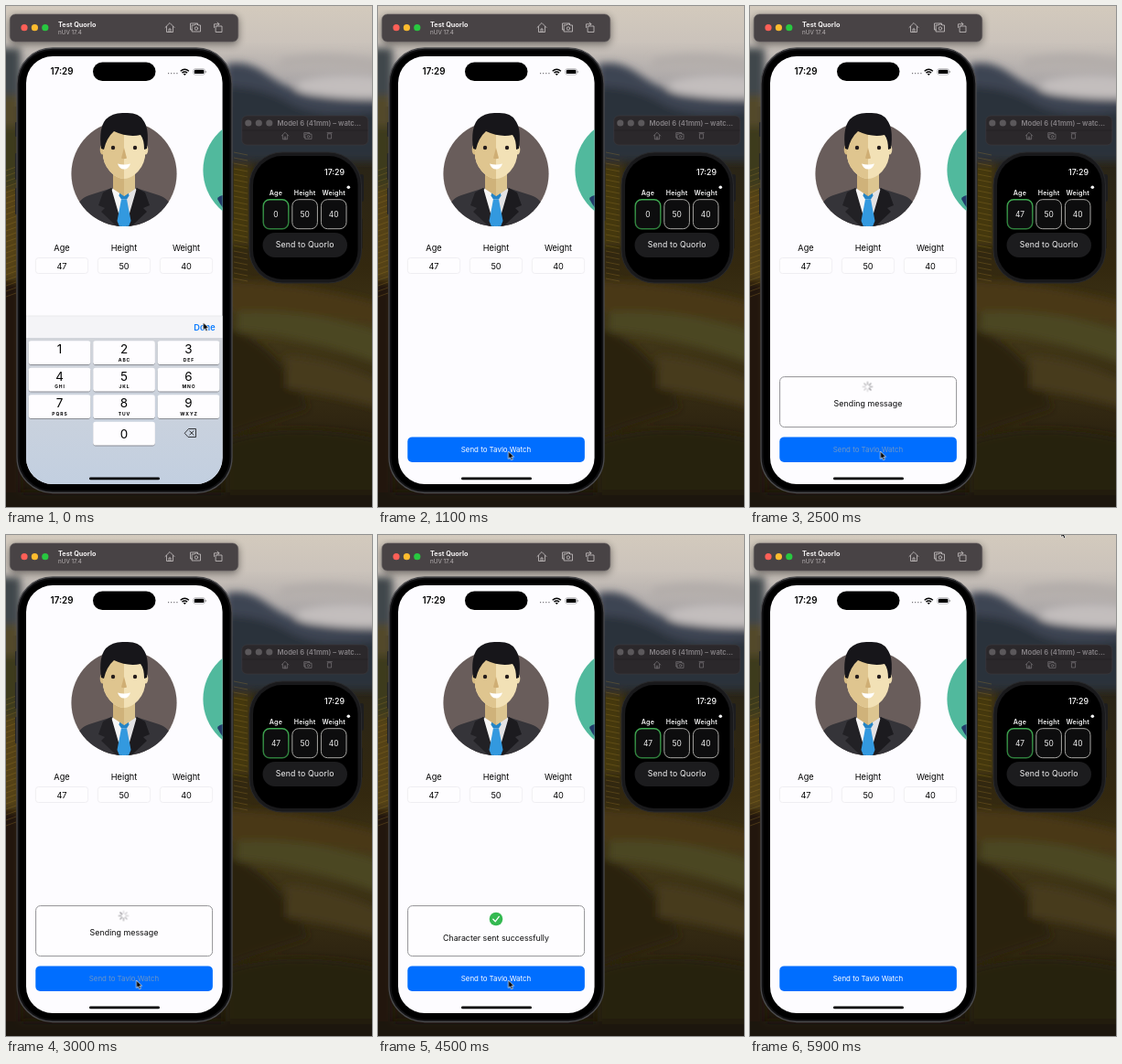
An HTML page that plays this animation: 400x548 px, repeating every 6000 ms.

```html
<!DOCTYPE html>
<html lang="en">
<head>
<meta charset="utf-8">
<title>Phone to watch</title>
<style>
  html, body { margin: 0; width: 100%; height: 100%; overflow: hidden; background: #17130f; }
  svg { display: block; width: 100vw; height: 100vh; }
  text { font-family: Inter, Roboto, sans-serif; }
  .mid { text-anchor: middle; }
  .icon { fill: none; stroke-width: .8; stroke-linejoin: round; stroke-linecap: round; }
</style>
</head>
<body>
<svg id="stage" viewBox="0 0 400 548" xmlns="http://www.w3.org/2000/svg">
  <defs>
    <linearGradient id="sky" x1="0" y1="0" x2="0" y2="1">
      <stop offset="0" stop-color="#d3cabd"/><stop offset=".3" stop-color="#cbc3bb"/>
      <stop offset=".65" stop-color="#a9a5a6"/><stop offset="1" stop-color="#4b535f"/>
    </linearGradient>
    <linearGradient id="land" x1="0" y1="0" x2="0" y2="1">
      <stop offset="0" stop-color="#2c333c"/><stop offset=".1" stop-color="#282418"/>
      <stop offset=".4" stop-color="#33280f"/><stop offset=".58" stop-color="#413718"/>
      <stop offset=".78" stop-color="#302611"/><stop offset="1" stop-color="#1c160c"/>
    </linearGradient>
    <linearGradient id="keys" x1="0" y1="0" x2="0" y2="1">
      <stop offset="0" stop-color="#d1d4da"/><stop offset="1" stop-color="#c2cfe0"/>
    </linearGradient>
    <linearGradient id="ring" x1="0" y1="0" x2="0" y2="1">
      <stop offset="0" stop-color="#3fa951"/><stop offset="1" stop-color="#2f7d3c"/>
    </linearGradient>
    <filter id="soft" x="-30%" y="-30%" width="160%" height="160%"><feGaussianBlur stdDeviation="4"/></filter>
    <filter id="shade" x="-20%" y="-20%" width="140%" height="150%"><feGaussianBlur stdDeviation="4"/></filter>
    <clipPath id="screen"><rect x="22" y="55" width="214.6" height="468" rx="29"/></clipPath>
    <clipPath id="disc"><circle cx="129" cy="183.5" r="57.6"/></clipPath>
  </defs>

  <!-- wallpaper -->
  <rect width="400" height="130" fill="url(#sky)"/>
  <rect y="110" width="400" height="438" fill="url(#land)"/>
  <g filter="url(#soft)">
    <path d="M240 64Q262 58 284 74T330 98L410 104V170H240Z" fill="#3d4553"/>
    <path d="M240 88Q280 88 310 106T410 114V170H240Z" fill="#2a303a"/>
    <path d="M318 84Q350 72 410 78V100Q360 104 318 92Z" fill="#c3bebd"/>
    <path d="M300 58Q350 46 410 60V72Q350 62 300 68Z" fill="#b3adaa"/>
    <path d="M-10 46H16V100H-10Z" fill="#3f464b"/>
    <path d="M-10 98H16V135H-10Z" fill="#53492a"/>
    <path d="M-10 132H16V200H-10Z" fill="#3d3a1c"/>
    <path d="M-10 200H16V300H-10Z" fill="#554315"/>
    <path d="M-10 300H16V560H-10Z" fill="#24190d"/>
    <path d="M240 172H268V262H240Z" fill="#45370f"/>
    <path d="M240 300Q320 302 410 326V352Q310 328 240 336Z" fill="#4a3916"/>
    <path d="M252 334Q330 330 410 356V392Q330 362 252 356Z" fill="#4c4620"/>
    <path d="M240 352Q276 362 300 392T330 440L240 470Z" fill="#2b2411"/>
    <path d="M306 382Q350 384 410 410V440Q350 424 306 418Z" fill="#473a1a"/>
    <path d="M240 476Q310 452 410 474V560H240Z" fill="#282010"/>
    <path d="M-10 532H410V560H-10Z" fill="#1a140b"/>
  </g>
  <g id="rows" stroke="#9b7a2c" stroke-width=".8" opacity=".4"/>

  <!-- phone window bar -->
  <rect x="4" y="11" width="250" height="31" rx="6" opacity=".45" filter="url(#shade)"/>
  <rect x="4.3" y="9" width="249.4" height="30" rx="6" fill="#484345" stroke="#625d5e" stroke-width=".6"/>
  <circle cx="20" cy="23.7" r="3.6" fill="#fe5f57"/>
  <circle cx="31.4" cy="23.7" r="3.6" fill="#febc2e"/>
  <circle cx="42.8" cy="23.7" r="3.6" fill="#28c840"/>
  <text x="57" y="23.3" font-size="7.3" font-weight="700" fill="#f3f1f1">Test Quorlo</text>
  <text x="57" y="31" font-size="6.3" fill="#b8b3b4">nUV 17.4</text>
  <g id="tools" class="icon" stroke="#c9c4c5"/>

  <!-- phone -->
  <g fill="#252527">
    <rect x="10" y="127" width="3" height="16" rx="1"/><rect x="10" y="161" width="3" height="29" rx="1"/>
    <rect x="10" y="199" width="3" height="29" rx="1"/><rect x="245.5" y="172" width="3" height="63" rx="1"/>
  </g>
  <rect x="12" y="46" width="235" height="486.5" rx="39" fill="#111113" stroke="#4b4b4e" stroke-width="1.3"/>
  <rect x="14.5" y="48.5" width="230" height="481.5" rx="36.5"/>
  <g clip-path="url(#screen)">
    <rect x="22" y="51" width="215" height="472" fill="#fdfcff"/>
    <circle cx="273" cy="179.5" r="57.6" fill="#51b99d"/>
    <path d="M231 211Q233 207 238 207V222Q234 217 231 211Z" fill="#223c69"/>

    <!-- avatar -->
    <circle cx="129" cy="183.5" r="57.6" fill="#695d5b"/>
    <g clip-path="url(#disc)">
      <path d="M74 228Q78 211 91 207L116 199H142L167 207Q180 211 184 228V245H74Z" fill="#353439"/>
      <path d="M117 199H141L147 208L131 244H127L111 208Z" fill="#f7f6f6"/>
      <path d="M129 200H141L147 208L131 244H129Z" fill="#e3e2e4"/>
      <path d="M115 199L106 204L101 218L108 221L104 225L124 244H128Z" fill="#222125"/>
      <path d="M143 199L152 204L157 218L150 221L154 225L134 244H130Z" fill="#1c1b1f"/>
      <path d="M124.500 203H133.500L134.500 207.500L132 211.500H126L123.500 207.500Z" fill="#2484c6"/>
      <path d="M126 211.500H132L136.500 235L133 244H125L121.500 235Z" fill="#3399df"/>
    </g>
    <path d="M117 178H141V200L129 208L117 200Z" fill="#cfb27a"/>
    <path d="M129 178H141V200L129 208Z" fill="#dcc590"/>
    <ellipse cx="105.5" cy="157" rx="2.8" ry="5.5" fill="#d8bc84"/>
    <ellipse cx="152.5" cy="157" rx="2.8" ry="5.5" fill="#efddb0"/>
    <path d="M106 136H152V165Q150 177 140 185Q134 189 129 189Q124 189 118 185Q108 177 106 165Z" fill="#f2e1b6"/>
    <path d="M106 136H129V189Q124 189 118 185Q108 177 106 165Z" fill="#dfc58f"/>
    <path d="M104 156Q101 134 109 124Q117 116 130 117Q145 116 150 125Q157 134 154 156L151 157Q151 146 147 141Q133 144 118 137Q110 144 107 157Z" fill="#17161a"/>
    <circle cx="117" cy="155" r="2.2" fill="#251d1c"/><circle cx="141" cy="155" r="2.2" fill="#251d1c"/>
    <path d="M129 155L132 166.500Q129 168 126 166.500Z" fill="#cfae74"/>
    <path d="M122 172.500Q129 174.500 136 172.500Q134 178.500 129 178.500Q124 178.500 122 172.500Z" fill="#fff"/>

    <g id="form"/>
    <rect x="32.3" y="471.4" width="193.6" height="27.5" rx="5" fill="#006eff"/>
    <text id="send" class="mid" x="129" y="488.300" font-size="7.9" fill="#fff">Send to Tavlo Watch</text>

    <!-- message panel -->
    <g id="panel" opacity="0">
      <rect x="32.6" y="405.600" width="193" height="55" rx="5" fill="#fefdff" stroke="#929296"/>
      <g id="busy">
        <g transform="translate(128.500 416.500)"><g id="spin"/></g>
        <text class="mid" x="129" y="438" font-size="8.9" fill="#0b0b0c">Sending message</text>
      </g>
      <g id="done" opacity="0">
        <circle cx="129" cy="420" r="7.3" fill="#34b951"/>
        <path d="M125.800 420.300L128.200 422.800L132.300 417.400" fill="none" stroke="#fff" stroke-width="1.3" stroke-linecap="round"/>
        <text class="mid" x="129" y="443.500" font-size="8.8" fill="#0b0b0c">Character sent successfully</text>
      </g>
    </g>

    <!-- keyboard -->
    <g id="board">
      <rect x="22" y="339" width="215" height="25" fill="#f4f4f7"/>
      <path d="M22 339H237" stroke="#dededf" stroke-width=".6"/>
      <text class="mid" x="217" y="354.600" font-size="9.2" font-weight="600" fill="#087aff">Done</text>
      <rect x="22" y="363" width="215" height="162" fill="url(#keys)"/>
    </g>
    <rect x="91" y="515.500" width="77" height="2.8" rx="1.4"/>

    <!-- status bar -->
    <rect x="95" y="61.500" width="68.500" height="20.600" rx="10.300"/>
    <text class="mid" x="61" y="75.300" font-size="9.8" font-weight="600">17:29</text>
    <path d="M177 73.700H188" stroke="#77767a" stroke-width="1.2" stroke-dasharray="1.2 1.9"/>
    <path d="M190.700 71.300Q195.300 67.300 199.900 71.300M192.500 73.100Q195.300 70.700 198.100 73.100" fill="none" stroke="#000" stroke-width="1.4"/>
    <path d="M193.700 74.300Q195.300 73.100 196.900 74.300L195.300 76Z"/>
    <rect x="204.800" y="68.700" width="12.600" height="6.400" rx="2" fill="none" stroke="#939296" stroke-width=".6"/>
    <rect x="205.800" y="69.700" width="10.600" height="4.400" rx="1.2"/>
    <rect x="218" y="70.900" width=".9" height="2" rx=".4" fill="#939296"/>
  </g>

  <!-- watch window bar -->
  <rect x="257.800" y="120" width="138" height="32" rx="5.500" fill="#2b282b" stroke="#3f3b3e" stroke-width=".6"/>
  <path d="M258 136H395.500" stroke="#242124" stroke-width=".6"/>
  <g fill="#5b585b"><circle cx="264.800" cy="128" r="3.6"/><circle cx="276.300" cy="128" r="3.6"/><circle cx="287.800" cy="128" r="3.6"/></g>
  <text x="296.500" y="130.600" font-size="7.6" font-weight="600" fill="#858185">Model 6 (41mm) – watc…</text>
  <g id="watchTools" class="icon" stroke="#858185"/>

  <!-- watch -->
  <rect x="386" y="184" width="5" height="30" rx="2.500" fill="#1d1d1f"/>
  <rect x="386" y="232" width="3.500" height="34" rx="1.700" fill="#19191b"/>
  <rect x="266" y="160" width="122.500" height="143" rx="36" fill="#19191b" stroke="#29292b"/>
  <rect x="270" y="164" width="114.500" height="135" rx="32"/>
  <text class="mid" x="359" y="184.600" font-size="8.800" font-weight="500" fill="#fff">17:29</text>
  <circle cx="374.300" cy="198.300" r="1.800" fill="#f5f5f5"/>
  <g id="watchForm"/>
  <rect x="280.500" y="248" width="92.500" height="27" rx="13.500" fill="#1c1c1e"/>
  <text class="mid" x="326.700" y="264.400" font-size="8.700" letter-spacing=".15" fill="#f5f5f6">Send to Quorlo</text>

  <path id="cursor" d="M0 0V8.500L1.900 6.800L3.200 9.700L4.800 9L3.500 6.200H6Z" stroke="#fff" stroke-width=".7" stroke-linejoin="round"/>
</svg>
<script>
const LOOP = 6000;
const byId = id => document.getElementById(id);

function add(parent, tag, attrs, text = '') {
  const el = document.createElementNS('http://www.w3.org/2000/svg', tag);
  for (const key in attrs) el.setAttribute(key, attrs[key]);
  el.textContent = text;
  parent.appendChild(el);
  return el;
}

const label = (parent, x, y, size, text, more = {}) =>
  add(parent, 'text', { class: 'mid', x, y, 'font-size': size, ...more }, text);

function drawTools(group, xs, y, scale) {
  const shapes = [
    'M-5 0L0 -5L5 0M-3.5 -1V5H3.5V-1M-1 5V1.5H1V5',
    'M-3 2.5H-5V-4.5H3V-3M-3 -2.5H-.5L.3 -3.6H2.7L3.5 -2.5H6V4.5H-3ZM3.2 1A1.7 1.7 0 1 1 -.2 1A1.7 1.7 0 1 1 3.2 1',
    'M-2.5 -1.5H4V5H-2.5ZM-4.5 0V-3.7H1M-1 -5.5L1 -3.7L-1 -2',
    'M-2.5 -3H2.5V4H-2.5ZM-3.5 -4.5H3.5'
  ];
  xs.forEach((x, i) => x && add(group, 'path', { d: shapes[i], transform: `translate(${x} ${y}) scale(${scale})` }));
}
drawTools(byId('tools'), [179, 206.5, 232], 23.5, 1);
drawTools(byId('watchTools'), [305, 329.5, 0, 353.7], 142, .75);

// vineyard rows
for (let i = 0; i < 24; i++) {
  const y = 180 + i * 6;
  add(byId('rows'), 'path', { d: `M0 ${y}L11 ${y - 4}M249 ${y - 20}L264 ${y - 17}` });
}

// form fields
let watchAge;
[['Age', 47], ['Height', 50], ['Weight', 40]].forEach(([name, value], i) => {
  const x = 61 + i * 68, form = byId('form');
  label(form, x, 268.4, 9.2, name);
  add(form, 'rect', { x: x - 28.6, y: 275.5, width: 57.2, height: 17, rx: 3, fill: '#fefdff', stroke: '#ecebef', 'stroke-width': .8 });
  label(form, x, 287.5, 9.2, value);

  const wx = 295 + i * 31.6, watch = byId('watchForm');
  label(watch, wx, 206.5, 7.1, name, { 'font-weight': 600, fill: '#f5f5f5', 'letter-spacing': .2 });
  add(watch, 'rect', {
    x: wx - 13.8, y: 211.7, width: 27.6, height: 32, rx: 7, fill: '#0d0d0e',
    stroke: i ? '#a9a8a5' : 'url(#ring)', 'stroke-width': i ? 1 : 1.4
  });
  const shown = label(watch, wx, 231, 8.4, value, { fill: '#f5f5f5' });
  if (!i) watchAge = shown;
});
const watchZero = label(byId('watchForm'), 295, 231, 8.4, '0', { fill: '#f5f5f5' });

// number pad
const letters = ['', 'ABC', 'DEF', 'GHI', 'JKL', 'MNO', 'PQRS', 'TUV', 'WXYZ'];
const board = byId('board');
function drawKey(n, col, row) {
  const x = 24.7 + col * 70.5, y = 366.3 + row * 29.5;
  add(board, 'rect', { x, y: y + .8, width: 67.7, height: 25.8, rx: 2.8, fill: '#8b8e95' });
  add(board, 'rect', { x, y, width: 67.7, height: 25.8, rx: 2.8, fill: '#fefdff' });
  label(board, x + 33.8, y + (n ? 13.8 : 18), 13.4, n);
  if (n && letters[n - 1])
    label(board, x + 34.3, y + 22.4, 5, letters[n - 1], { 'font-weight': 700, 'letter-spacing': .9 });
}
for (let n = 1; n < 10; n++) drawKey(n, (n - 1) % 3, Math.floor((n - 1) / 3));
drawKey(0, 1, 3);
add(board, 'path', {
  class: 'icon', stroke: '#111',
  d: 'M195.5 467L199.5 462.5H207.5V471.5H199.5ZM200.7 464.8L205 469.2M205 464.8L200.7 469.2'
});

// spinner
for (let i = 0; i < 8; i++)
  add(byId('spin'), 'path', {
    d: 'M0 -2.5V-5.2', stroke: '#77767a', 'stroke-width': 1.2, 'stroke-linecap': 'round',
    opacity: .3 + i * .08, transform: `rotate(${i * 45})`
  });

// steps: [time, value, easing towards the next step]
function play(el, prop, steps, duration = LOOP) {
  const frames = steps.map(([time, value, easing = 'linear']) => ({ offset: time / duration, [prop]: value, easing }));
  el.animate(frames, { duration, iterations: Infinity }).startTime = document.timeline.currentTime ?? 0;
}
const move = (x, y) => `translate(${x}px, ${y}px)`;
const hard = (a, b, time) => [[0, a], [time, a], [time, b], [LOOP, b]];

play(byId('cursor'), 'transform', [
  [0, move(215.5, 346)], [300, move(215.5, 346), 'ease-in-out'],
  [950, move(142.5, 487)], [4900, move(142.5, 487), 'ease-in-out'],
  [5800, move(340, -6)], [LOOP, move(340, -6)]
]);
play(board, 'transform', [
  [0, move(0, 0)], [200, move(0, 0), 'cubic-bezier(.2,.8,.2,1)'],
  [600, move(0, 186)], [LOOP, move(0, 186)]
]);
play(byId('send'), 'fill', [
  [0, '#fff'], [1700, '#fff'], [1800, '#6c96c8'], [3450, '#6c96c8'], [3550, '#fff'], [LOOP, '#fff']
]);
play(byId('panel'), 'opacity', [
  [0, 0], [1700, 0], [2100, 1], [5100, 1], [5400, 0], [LOOP, 0]
]);
play(byId('busy'), 'opacity', hard(1, 0, 3500));
play(byId('done'), 'opacity', hard(0, 1, 3500));
play(watchZero, 'opacity', hard(1, 0, 2500));
play(watchAge, 'opacity', hard(0, 1, 2500));
play(byId('spin'), 'transform', [[0, 'rotate(0deg)', 'steps(8)'], [1000, 'rotate(360deg)']], 1000);
</script>
</body>
</html>
```
